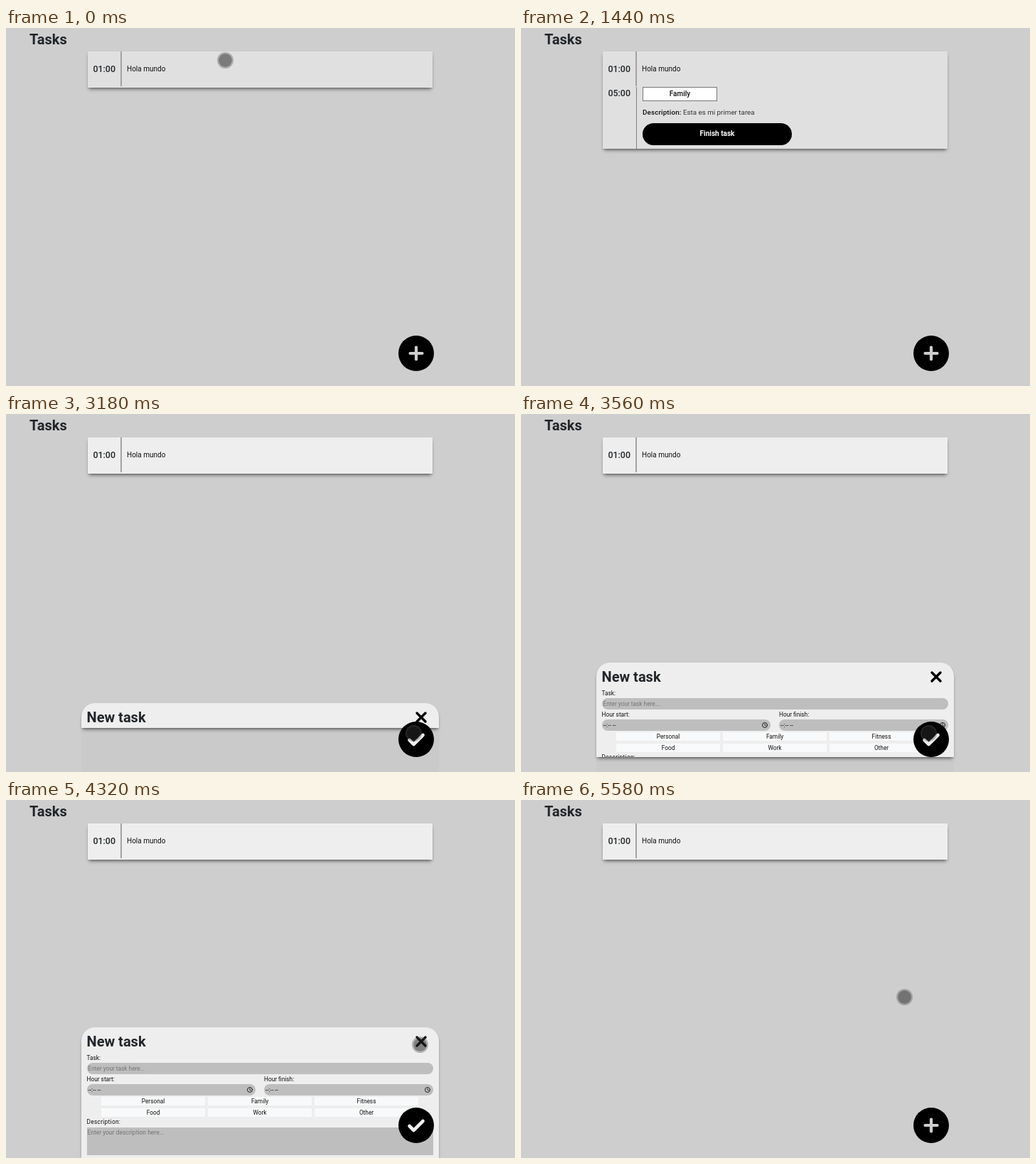
An HTML page for the animation above (5600 ms loop, 716 by 504 pixels).

```html
<!DOCTYPE html>
<html lang="en">
<head>
<meta charset="utf-8">
<title>Tasks</title>
<style>
  html, body { margin: 0; width: 100%; height: 100%; overflow: hidden; background: #cecece; }
  body { position: relative; font: 400 8.3px Roboto, Arial, sans-serif; color: #111; }
  body *, body { box-sizing: border-box; }
  div, svg { position: absolute; }
  .t { white-space: nowrap; height: 20px; line-height: 20px; }
  .h { font-size: 20px; font-weight: 600; color: #212529; height: 24px; line-height: 24px; }
  #card, #panel { background: #eee; box-shadow: 0 4px 5px -2px rgba(0,0,0,.5), 0 1px 2px rgba(0,0,0,.15); }
  #panel, #details { overflow: hidden; }
  #card { left: 115px; top: 33px; width: 484.5px; }
  #details { left: 0; right: 0; top: 50px; }
  #card .t { font-size: 10px; }
  #card .time { left: 7.5px; font-size: 12.4px; font-weight: 500; color: #212529; }
  .tag { left: 56px; top: 0; width: 105px; height: 20px; background: #fff; border: 1px solid #777; }
  .done { left: 56px; top: 51px; width: 210px; height: 31px; border-radius: 16px; background: #000; color: #fff; }
  .mid { left: 0; right: 0; text-align: center; }
  #card .about { left: 56px; top: 26px; color: #333; font-size: 9.8px; }
  .about b { font-weight: 500; letter-spacing: .15px; color: #111; }
  #panel { border-radius: 19px 19px 0 0; }
  #form { height: 180px; }
  .field { height: 15.5px; line-height: 16px; border-radius: 8px; background: #bebebe; padding-left: 2px; white-space: nowrap; }
  .field svg { right: 3px; top: 3px; }
  .hint { color: #757575; }
  .half { width: calc(50% - 6px); top: 72px; }
  .pick { width: calc((100% - 49px) / 3); height: 12px; line-height: 12px; background: #f8f9fa; text-align: center; }
  #band { left: 105.5px; width: 503px; bottom: 0; background: rgba(0,0,0,.02); }
  #fab { left: 552px; top: 432.5px; width: 50px; height: 50px; border-radius: 50%; background: #000; z-index: 2; }
  #dot { width: 23px; height: 23px; margin: -11.5px; border-radius: 50%; background: rgba(40,40,40,.55);
    border: 2px solid rgba(96,96,96,.4); background-clip: padding-box; z-index: 9; }
  path, circle { fill: none; stroke-linecap: round; stroke-linejoin: round; }
</style>
</head>
<body>
<div class="t h" style="left:33px;top:4px">Tasks</div>

<div id="card">
  <div class="t time" style="top:15px">01:00</div>
  <div style="left:46px;top:0;width:2px;height:49px;background:#a3a3a3"></div>
  <div class="t" style="left:55px;top:15px">Hola mundo</div>
  <div id="details">
    <div class="t time" style="top:-1px">05:00</div>
    <div style="left:47px;top:0;width:1px;height:87px;background:#808080"></div>
    <div class="tag"><div class="t mid" style="top:-1px;font-weight:500">Family</div></div>
    <div class="t about"><b>Description:</b> Esta es mi primer tarea</div>
    <div class="done"><div class="t mid" style="top:5px;font-weight:600">Finish task</div></div>
  </div>
</div>

<div id="band"></div>
<div id="panel">
  <div id="form">
    <div class="t h" style="left:0;top:0">New task</div>
    <div class="t" style="left:0;top:25px">Task:</div>
    <div class="field hint" style="left:0;right:0;top:42px">Enter your task here...</div>
    <div class="t" style="left:0;top:55px">Hour start:</div>
    <div class="t" style="left:calc(50% + 6px);top:55px">Hour finish:</div>
    <div class="field half" style="left:0">--:-- --</div>
    <div class="field half" style="right:0">--:-- --</div>
    <div class="t" style="left:0;top:115px;letter-spacing:.3px">Description:</div>
    <div class="hint" style="left:0;right:0;top:133px;height:39px;background:#bebebe;padding:2px 1px;font-size:8.5px">Enter your description here...</div>
  </div>
  <svg id="close" width="20" height="20" style="right:15px"><path d="M4 4L16 16M16 4L4 16" stroke="#000" stroke-width="3.4"/></svg>
</div>

<div id="fab">
  <svg width="50" height="50"><path id="icon"/></svg>
</div>
<div id="dot"></div>

<script>
const LOOP = 5600;
const el = id => document.getElementById(id);
const [card, details, panel, form, closeX, band, icon, dot] =
  ['card', 'details', 'panel', 'form', 'close', 'band', 'icon', 'dot'].map(el);

['Personal', 'Family', 'Fitness', 'Food', 'Work', 'Other'].forEach((name, i) => {
  const pick = document.createElement('div');
  const col = i % 3;
  pick.className = 'pick';
  pick.textContent = name;
  pick.style.left = `calc(20.5px + ${col} * ((100% - 49px) / 3 + 4px))`;
  pick.style.top = (i < 3 ? 90 : 106) + 'px';
  form.append(pick);
});
document.querySelectorAll('.half').forEach(field => field.insertAdjacentHTML('beforeend',
  '<svg width="10" height="10"><circle cx="5" cy="5" r="3.5" stroke="#111" stroke-width=".9"/><path d="M5 3V5.2L6.5 6" stroke="#111" stroke-width=".8"/></svg>'));

function bezier(x1, y1, x2, y2) {
  const at = (a, b, u) => 3 * a * u * (1 - u) ** 2 + 3 * b * u * u * (1 - u) + u ** 3;
  return x => {
    let lo = 0, hi = 1;
    for (let i = 0; i < 24; i++) {
      const u = (lo + hi) / 2;
      if (at(x1, x2, u) < x) lo = u; else hi = u;
    }
    return at(y1, y2, lo);
  };
}
const ease = bezier(.25, .1, .25, 1);
const easeInOut = bezier(.42, 0, .58, 1);
const part = (t, start, length) => Math.min(1, Math.max(0, (t - start) / length));

// pointer strokes: [time, x, y] points; hidden outside each stroke
const strokes = [
  [[0, 308.5, 45.5], [920, 308.5, 45.5], [940, 350, 49], [1000, 350, 49], [1020, 393, 54], [1440, 393, 54]],
  [[2020, 425, 115], [2080, 490, 262]],
  [[2500, 566.5, 444.5], [2540, 570, 447], [2720, 573.5, 449.5], [3800, 573.5, 449.5], [4040, 576.5, 366.5],
   [4200, 581, 349], [4320, 582.5, 344.5], [4500, 582.5, 344.5], [4600, 583.5, 341.5], [5080, 583.5, 341.5],
   [5580, 539.5, 277.5], [LOOP, 539.5, 277.5]]
];

function pointer(t) {
  const path = strokes.find(s => t >= s[0][0] && t < s[s.length - 1][0]);
  if (!path) return null;
  const i = path.findIndex(p => p[0] > t);
  const [t0, x0, y0] = path[i - 1], [t1, x1, y1] = path[i];
  const k = (t - t0) / (t1 - t0);
  return [x0 + (x1 - x0) * k, y0 + (y1 - y0) * k];
}

function drawCard(t) {
  const open = ease(part(t, 90, 620)) - ease(part(t, 1440, 620));
  card.style.height = 50.5 + 86.5 * open + 'px';
  details.style.height = 87 * open + 'px';
  card.style.background = t < 2900 ? '#e0e0e0' : '#eee';
}

function drawPanel(t) {
  const shown = t >= 2920 && t < 5500;
  const closing = t >= 4500;
  const open = closing ? 1 - easeInOut(part(t, 4490, 1000)) : easeInOut(part(t, 2945, 1000));
  const pad = closing ? 0 : 8;
  const inset = closing ? 105 : 105.5;
  const bottom = 69.5 * (1 - open);
  panel.style.display = shown ? '' : 'none';
  panel.style.left = inset + 'px';
  panel.style.width = 714 - 2 * inset + 'px';
  panel.style.height = 168 * open + 2 * pad + 'px';
  panel.style.bottom = bottom + 'px';
  panel.style.zIndex = closing ? 3 : 1;
  form.style.left = form.style.right = form.style.top = pad + 'px';
  closeX.style.top = pad + 2 + 'px';
  band.style.display = shown && !closing ? '' : 'none';
  band.style.height = bottom + 'px';
}

function drawFab(t) {
  const check = t >= 2900 && t < 4500;
  icon.setAttribute('d', check ? 'M15.5 26L21.5 32L34.5 19' : 'M16.5 25H33.5M25 16.5V33.5');
  icon.setAttribute('stroke', check ? '#eee' : '#cecece');
  icon.setAttribute('stroke-width', check ? 4.6 : 4.2);
}

function drawDot(t) {
  const at = pointer(t);
  dot.style.display = at ? '' : 'none';
  if (at) {
    dot.style.left = at[0] + 'px';
    dot.style.top = at[1] + 'px';
  }
}

const start = performance.now();
function frame() {
  const t = (performance.now() - start) % LOOP;
  drawCard(t);
  drawPanel(t);
  drawFab(t);
  drawDot(t);
  requestAnimationFrame(frame);
}
frame();
</script>
</body>
</html>
```
